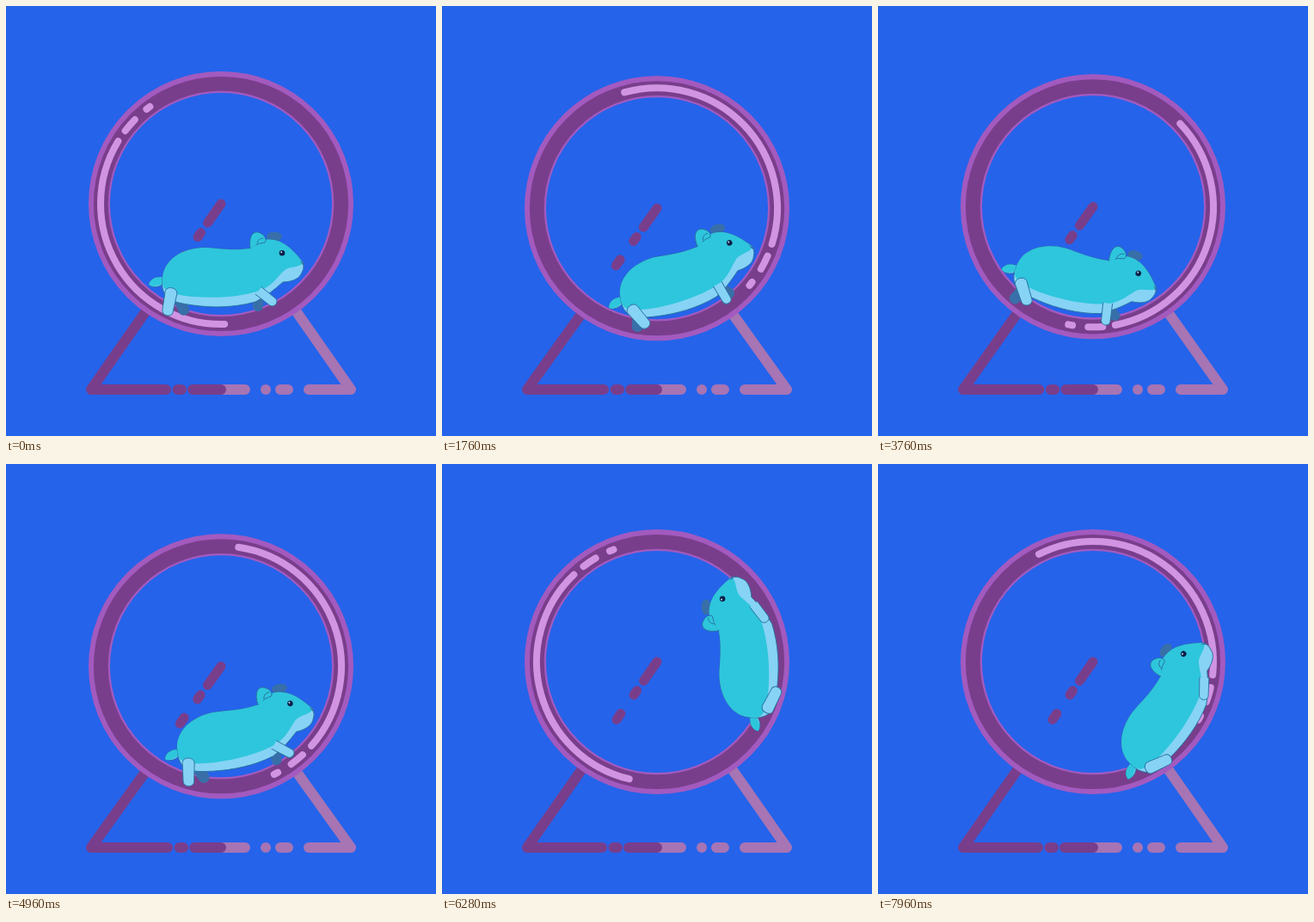
An HTML page for the animation above (8 s loop, 500 by 500 pixels).

```html
<!DOCTYPE html>
<html lang="en">
<head>
<meta charset="utf-8">
<title>Hamster wheel</title>
<style>
  html, body { margin: 0; width: 100%; height: 100%; overflow: hidden; background: #2563eb; }
  svg { display: block; width: 100%; height: 100%; }
  .line { fill: none; stroke-linecap: round; stroke-linejoin: round; }
  .dark { stroke: #793e8b; }
  .pale { stroke: #a774b4; }
  .shine { stroke: #d094e2; stroke-width: 8; }
  .teal { fill: #2ec6dc; }
  .light { fill: #86d3f5; }
  .shade { fill: #386fa9; }
  .ink { stroke: #28709f; stroke-width: .9; stroke-linejoin: round; stroke-linecap: round; }
</style>
</head>
<body>
<svg viewBox="0 0 500 500">
  <g class="line" stroke-width="12">
    <path id="rightStand" class="pale"/>
    <path class="pale" d="M250 446H278M302 446h.1M319 446H328"/>
    <path id="leftStand" class="dark"/>
  </g>
  <g id="wheel">
    <circle r="141.5" class="line" stroke="#a35abf" stroke-width="25"/>
    <circle r="139.7" class="line dark" stroke-width="16.8"/>
    <g id="shine" class="line shine"></g>
  </g>
  <path id="axle" class="line dark" stroke-width="11" stroke-dasharray="27 14 6 26.5 8.5 999"/>
  <g id="hamster">
    <g id="farHind"><rect class="shade" x="-6.5" y="-6" width="13" height="32" rx="6"/></g>
    <g id="farFront"><rect class="shade" x="-6" y="-6" width="12" height="28" rx="6"/></g>
    <ellipse class="shade" cx="312" cy="268" rx="9" ry="5.5"/>
    <path class="light ink" d="M187 317C178 313 168 316 166 324C171 328 178 327 183 323Q187 329 194 332Z"/>
    <path class="teal" d="M187 317C178 313 168 316 166 324C171 328 178 325 185 321Z"/>
    <path class="light ink" d="M182 317C183 295 205 281 232 281C250 282 262 285 284 282L300 272C319 269 332 281 346 299Q347 306 343 312C340 318 330 321 322 321C312 330 302 338 290 344C265 351 240 351 218 348C204 346 190 344 185 336Q180 327 182 317Z"/>
    <path class="teal" d="M182 317C183 295 205 281 232 281C250 282 262 285 284 282L300 272C319 269 332 281 346 299C340 305 328 302 322 309C314 317 308 327 292 332C265 340 225 341 197 335Q179 331 182 317Z"/>
    <path class="shade" d="M342 296L346.500 299L345.500 302Z"/>
    <path class="teal ink" d="M284 282C282 268 287 262 293 263C300 265 304 271 301 275C297 276 293 276 291 278"/>
    <path class="ink" fill="none" d="M292 276Q293 270 299 270"/>
    <circle cx="321" cy="287.300" r="3.300" fill="#0d2149"/>
    <circle cx="320.200" cy="286.200" r="1" fill="#b8e5f8"/>
    <g id="nearHind"><path class="light ink" d="M-7 -1C-6 -7 6 -7 7 0L6 23C5 29 -6 29 -6.500 22Z"/></g>
    <g id="nearFront"><path class="light ink" d="M-5.500 -3L-5 18C-4 24 5 24 5.500 18L5.500 -3"/></g>
  </g>
</svg>
<script>
const LOOP = 8000, STRIDE = 330, BOUNCE = 800, SLIP = 5500;
const $ = id => document.getElementById(id);
const set = (id, name, value) => $(id).setAttribute(name, value);
const mix = (a, b, k) => a + (b - a) * k;
const clamp = x => Math.min(1, Math.max(0, x));
const smooth = x => { x = clamp(x); return x * x * (3 - 2 * x); };

const spin = [[0, 88], [1760, 614], [2800, 959.5], [3760, 1396], [4960, 1718], [6280, 2263], [7960, 2763]];
const orbit = [[0, 0], [1760, -15], [2800, .4], [3760, 15], [4960, -10.7], [SLIP, 0], [6280, 268], [7960, 667]];

// Smooth curve through the keys that never overshoots them.
function follow(keys, t) {
  const last = keys.length - 2;
  const slope = i => (keys[i + 1][1] - keys[i][1]) / (keys[i + 1][0] - keys[i][0]);
  const tangent = i => {
    if (i === 0) return slope(0);
    if (i > last) return slope(last);
    const a = slope(i - 1), b = slope(i);
    return a * b > 0 ? 2 * a * b / (a + b) : 0;
  };
  let i = 0;
  while (i < last && t >= keys[i + 1][0]) i++;
  const [t0, v0] = keys[i], [t1, v1] = keys[i + 1];
  const span = t1 - t0, u = (t - t0) / span, w = 1 - u;
  return v0 * w * w * (1 + 2 * u) + v1 * u * u * (3 - 2 * u)
    + span * u * w * (tangent(i) * w - tangent(i + 1) * u);
}

function arc(from, to, r = 140) {
  const point = deg => {
    const a = deg * Math.PI / 180;
    return `${r * Math.cos(a)} ${r * Math.sin(a)}`;
  };
  return `<path d="M${point(from)}A${r} ${r} 0 0 1 ${point(to)}"/>`;
}
$('shine').innerHTML = arc(0, 123) + arc(129, 136) + arc(143.5, 145.5);

function sag(t) {
  if (t > 5600) return 0;
  const u = t % BOUNCE / BOUNCE - .43;
  return Math.max(0, 15.1 * Math.exp(-u * u / .054) - .5);
}

function limb(id, x, y, forward) {
  set(id, 'transform', `translate(${x} ${y}) rotate(${-forward})`);
}

function draw(t) {
  const bob = sag(t), hub = 230 + bob, shift = bob * .4;
  const step = -Math.cos(2 * Math.PI * t / STRIDE);
  const fling = smooth((t - SLIP) / 300);

  // Both legs start beneath the rim.
  const rim = 142 / Math.hypot(151, 446 - hub);
  const dx = 151 * rim, y = hub + (446 - hub) * rim;
  set('leftStand', 'd', `M${250 - dx} ${y}L99 446H${186 + shift}M${199.5 + shift} 446h4.500M${217 + shift} 446H250`);
  set('rightStand', 'd', `M${250 + dx} ${y}L401 446H352`);
  set('axle', 'd', `M250 ${hub}L99 446`);

  set('wheel', 'transform', `translate(250 ${hub})`);
  set('shine', 'transform', `rotate(${follow(spin, t) % 360})`);

  const drop = mix(2.2 * (1 + step), 21, fling);
  set('hamster', 'transform',
    `translate(250 ${hub}) rotate(${follow(orbit, t)}) translate(-250 ${drop - 230})`);
  limb('nearHind', 192, mix(333, 336, fling), mix(14 + 24 * step, 62, fling));
  limb('farHind', 199, 335, mix(-5 - 28 * step, 75, fling));
  limb('nearFront', mix(296, 311, fling), mix(333, 325, fling), mix(27 - 24 * step, -55, fling));
  limb('farFront', 294, 333, mix(30 + 34 * step, -75, fling));
}

function tick() {
  draw(performance.now() % LOOP);
  requestAnimationFrame(tick);
}
tick();
</script>
</body>
</html>
```
